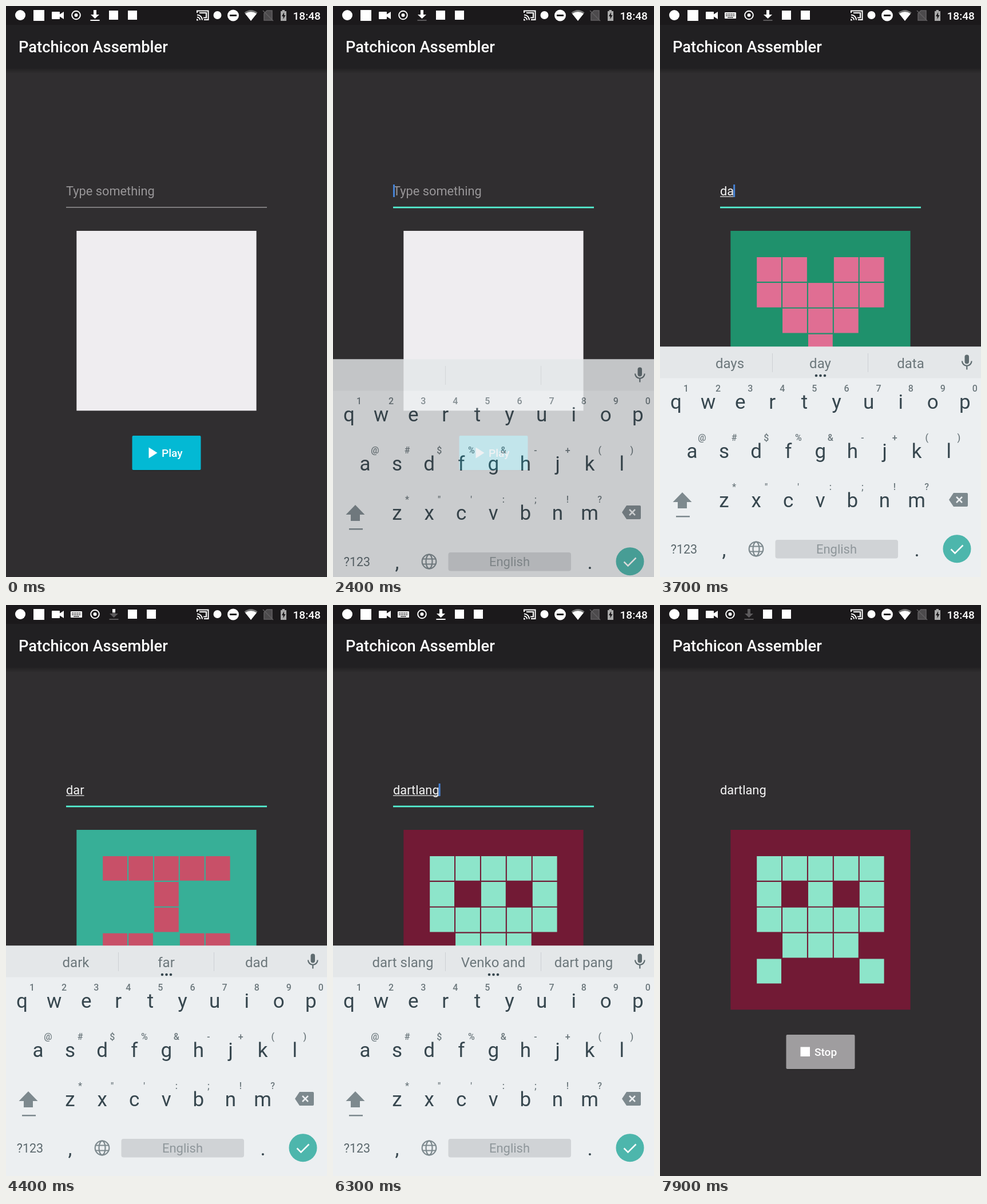
These frames come from a looping animation (561x998 px, 8000 ms). An HTML page:

```html
<!DOCTYPE html>
<html lang="en">
<head>
<meta charset="utf-8">
<title>Patchicon Assembler</title>
<style>
html, body { margin: 0; width: 100%; height: 100%; overflow: hidden; background: #302e30; }
svg { display: block; width: 561px; height: 998px; font-family: Roboto, "Noto Sans", sans-serif; }
.medium { font-weight: 500; }
</style>
</head>
<body>
<svg id="stage" viewBox="0 0 561 998">
  <defs>
    <linearGradient id="barShadow" x2="0" y2="1">
      <stop offset="0" stop-color="#000" stop-opacity=".28"/>
      <stop offset="1" stop-color="#000" stop-opacity="0"/>
    </linearGradient>
    <clipPath id="downloadClip"><rect id="downloadLevel" x="-12" y="0" width="24" height="33"/></clipPath>
    <g id="downloadShape"><path d="M-2.5 7h5v8h5L0 22-7.5 15h5z"/><path d="M-8 24H8v2H-8z"/></g>
  </defs>
  <rect width="561" height="998" fill="#302e30"/>
  <rect y="33" width="561" height="76" fill="#212022"/>
  <rect y="109" width="561" height="9" fill="url(#barShadow)"/>
  <rect width="561" height="33" fill="#1b191b"/>
  <text class="medium" x="22" y="81" font-size="27.300" fill="#fff">Patchicon Assembler</text>

  <g id="status" fill="#fff">
    <circle cx="25" cy="16" r="9"/>
    <rect x="48" y="7" width="19" height="19"/>
    <path d="M81 10h12q1 0 1 1v3.500l7-4.500v13l-7-4.500V22q0 1-1 1H81q-1 0-1-1V11q0-1 1-1z"/>
    <g id="keyboardIcon">
      <rect x="113" y="11" width="20" height="11" rx="1"/>
      <path d="M115 14h16M115 17h16" stroke="#1b191b" stroke-width="1.500" stroke-dasharray="2 1"/>
      <path d="M118 20h10" stroke="#1b191b" stroke-width="1.300"/>
    </g>
    <g id="notices">
      <circle cx="122.500" cy="16" r="7.300" fill="none" stroke="#fff" stroke-width="2"/>
      <circle cx="122.500" cy="16" r="3"/>
      <g transform="translate(155.500)">
        <use href="#downloadShape" fill="#5c5a5c"/>
        <g clip-path="url(#downloadClip)"><use href="#downloadShape"/></g>
      </g>
      <rect x="180" y="8" width="16" height="16"/>
      <rect x="213" y="8" width="16" height="16"/>
    </g>
    <g fill="none" stroke="#fff" stroke-width="2">
      <path d="M334 12V8.500h19.500V24H346M334 15.500a9 9 0 0 1 9 9M334 19.500a5 5 0 0 1 5 5"/>
      <path d="M338 12h12v8.500h-5"/>
    </g>
    <path d="M333 22.500a3 3 0 0 1 3 3h-3z"/>
    <circle cx="369.500" cy="16" r="7"/>
    <circle cx="397" cy="16.500" r="10"/>
    <path d="M391 15h12v3h-12z" fill="#1b191b"/>
    <path d="M428 26 416.500 11.500Q428 2.500 439.500 11.500z" fill="#777"/>
    <path d="M428 26 418 13.500Q428 7 438 13.500z"/>
    <path d="M456 8h9v17h-14V13zM449 8l18 18" fill="#4c4a4c" stroke="#615f61" stroke-width="1.500"/>
    <path d="M482.500 7h4.500v2h3v17h-10V9h2.500z" fill="#aaa"/>
    <path d="M486 11l-4 7h2.500v5l4-7H486z" fill="#1b191b"/>
    <text class="medium" x="501.500" y="24" font-size="19.100">18:48</text>
  </g>

  <text id="field" x="105" y="331" font-size="21.800"></text>
  <rect id="composing" x="105" y="332.500" height="1.300" fill="#ddd"/>
  <rect id="cursor" y="312" width="3" height="22" fill="#4682d4"/>
  <rect id="fieldLine" x="105" width="351"/>

  <rect id="board" x="123.300" y="393" width="314.300" height="314.300"/>
  <path id="cells"/>

  <rect x="221" y="752" width="119" height="60.500" rx="2" fill="#000" opacity=".2"/>
  <rect id="button" x="220.500" y="751" width="120" height="60" rx="2"/>
  <path id="buttonIcon" fill="#fff"/>
  <text id="buttonLabel" class="medium" y="788" font-size="19.100" fill="#fff"></text>

  <g id="keyboard">
    <rect y="595.500" width="561" height="440" fill="#eceff1"/>
    <rect y="595.500" width="561" height="55" fill="#e4e7e9"/>
    <path d="M196.500 607v33M363.500 607v33" stroke="#cdd1d4"/>
    <g id="words" font-size="24" fill="#6c777b" text-anchor="middle"></g>
    <g id="dots" fill="#37474f"><circle cx="273" cy="646" r="2.300"/><circle cx="280.500" cy="646" r="2.300"/><circle cx="288" cy="646" r="2.300"/></g>
    <rect x="532.500" y="609.500" width="7.500" height="16" rx="3.700" fill="#5f6c70"/>
    <path d="M528 620.500a8.300 8.300 0 0 0 16.600 0M536.300 629.500v6" fill="none" stroke="#5f6c70" stroke-width="2.200"/>
    <g id="keys" fill="#37474f" text-anchor="middle"></g>
    <g fill="#7d898e">
      <path d="M39 850 55.500 867H47v11H31v-11h-8.500z"/>
      <rect x="28" y="891" width="24" height="2.500"/>
      <path d="M513 851h23q2 0 2 2v20q0 2-2 2h-23l-8-12z"/>
    </g>
    <path d="M518 858l10 10m0-10l-10 10" stroke="#eceff1" stroke-width="2.500"/>
    <text x="42" y="956.500" font-size="21.500" fill="#5b686d" text-anchor="middle">?123</text>
    <g fill="none" stroke="#7d898e" stroke-width="2.200">
      <circle cx="168" cy="949" r="12.300"/><ellipse cx="168" cy="949" rx="5.500" ry="12.300"/>
      <path d="M157 944.500h22M157 953.500h22"/>
    </g>
    <rect x="201.500" y="933" width="214.500" height="32.500" rx="4" fill="#d0d3d6"/>
    <text x="308.500" y="956.500" font-size="22" fill="#8f979b" text-anchor="middle">English</text>
    <circle cx="519" cy="948.700" r="24.500" fill="#4db6ac"/>
    <path d="M508.500 949.500l7 7 14-14" fill="none" stroke="#fff" stroke-width="2.500"/>
  </g>
</svg>
<script>
const LOOP = 8000;
const FOCUS = 2000, KEYBOARD_IN = 2310, ICON_IN = 2600;
const BLUR = 6650, KEYBOARD_OUT = 6820, ICON_OUT = 6850, PRESS = 7650;

// Each row of a pattern holds its left half and middle; the right half mirrors it.
const edits = [
  { at: 0, text: "", color: "#efedf0", rows: [], words: [] },
  { at: 3000, text: "d", color: "#7b4fa3", rows: ["101", "010", "111", "011", "100"], words: ["did", "do", "don't"] },
  { at: 3500, text: "da", color: "#1f916c", rows: ["110", "111", "011", "001", "010"], words: ["days", "day", "data"] },
  { at: 3850, text: "dar", color: "#37af97", rows: ["111", "001", "001", "110", "101"], words: ["dark", "far", "dad"] },
  { at: 5200, text: "dart", color: "#a5742c", rows: ["011", "110", "101", "111", "010"], words: ["darts", "dart", "dirt"] },
  { at: 5400, text: "dartl", color: "#3d65b0", rows: ["101", "111", "010", "101", "110"], words: ["dart", "darts", "dartle"] },
  { at: 5550, text: "dartla", color: "#60a02f", rows: ["111", "100", "111", "010", "101"], words: ["Brinu", "Venko", "darts"] },
  { at: 5780, text: "dartlan", color: "#2b7f9e", rows: ["010", "111", "101", "110", "011"], words: ["dart land", "Venko an", "dart plan"] },
  { at: 5980, text: "dartlang", color: "#721a35", rows: ["111", "101", "111", "011", "100"], words: ["dart slang", "Venko and", "dart pang"] }
];

const $ = id => document.getElementById(id);
const set = (node, attrs) => { for (const k in attrs) node.setAttribute(k, attrs[k]); };
const clamp = v => Math.max(0, Math.min(1, v));
const show = (node, on) => set(node, { visibility: on ? "visible" : "hidden" });

function addText(parent, text, attrs) {
  const node = document.createElementNS("http://www.w3.org/2000/svg", "text");
  node.textContent = text;
  set(node, attrs);
  parent.appendChild(node);
  return node;
}

function addKeys(letters, hints, left, y) {
  [...letters].forEach((letter, i) => {
    const x = left + i * 56.1;
    addText($("keys"), letter, { x, y, "font-size": 35 });
    addText($("keys"), hints[i], { x: x + 17.5, y: y - 30, "font-size": 16, fill: "#6c787d", class: "medium" });
  });
}

addKeys("qwertyuiop", "1234567890", 28, 704);
addKeys("asdfghjkl", "@#$%&-+()", 56, 790);
addKeys("zxcvbnm", "*\"':;!?", 112, 875.5);
addText($("keys"), ",", { x: 112, y: 962, "font-size": 35 });
addText($("keys"), ".", { x: 449, y: 962, "font-size": 35 });
const words = [122, 280, 438].map(x => addText($("words"), "", { x, y: 633 }));

function complement(hex) {
  return "#" + (0xffffff ^ parseInt(hex.slice(1), 16)).toString(16).padStart(6, "0");
}

function cellPath(rows) {
  const pitch = 44.9, size = 42.8;
  let d = "";
  rows.forEach((row, y) => {
    for (let x = 0; x < 5; x++) {
      if (row[Math.min(x, 4 - x)] === "1") {
        d += `M${124.3 + (x + 1) * pitch} ${394.1 + (y + 1) * pitch}h${size}v${size}h${-size}z`;
      }
    }
  });
  return d;
}

function drawStatus(t) {
  const typing = t >= ICON_IN && t < ICON_OUT;
  set($("notices"), { transform: `translate(${typing ? 33 : 0})` });
  set($("keyboardIcon"), { opacity: typing ? 1 : t >= ICON_OUT ? 0.6 * clamp((7000 - t) / 100) : 0 });
  const step = Math.floor((t + 60) % 1260 / 210);
  set($("downloadLevel"), { height: [33, 0, 10, 13, 15, 23][step] });
}

function drawField(t, edit) {
  const focused = t >= FOCUS && t < BLUR;
  const field = $("field");
  field.textContent = edit.text || "Type something";
  set(field, { fill: edit.text ? "#f4f4f4" : "#989698" });
  const width = edit.text ? field.getComputedTextLength() : 0;
  set($("composing"), { width });
  show($("composing"), focused && edit.text);
  set($("cursor"), { x: 105 + width - (width ? 1 : 0) });
  show($("cursor"), focused && (t - Math.max(FOCUS, edit.at)) % 1000 < 500);
  set($("fieldLine"), focused
    ? { y: 350.7, height: 2.7, fill: "#55f3d5" }
    : { y: 351, height: 1.7, fill: "#8b898b" });
  show($("fieldLine"), t < PRESS);
}

function drawButton(playing) {
  set($("button"), { fill: playing ? "#9f9d9f" : "#03b9d4" });
  set($("buttonIcon"), { d: playing ? "M245.500 772.500h16.500v16.500h-16.500z" : "M249.500 771.500v19l15-9.500z" });
  $("buttonLabel").textContent = playing ? "Stop" : "Play";
  set($("buttonLabel"), { x: playing ? 270 : 272 });
}

function drawKeyboard(t, edit) {
  const enter = clamp((t - KEYBOARD_IN) / 220);
  const leave = clamp((t - KEYBOARD_OUT) / 200);
  const shift = Math.round(63 * (1 - enter) ** 2 + 81 * leave ** 2);
  const opacity = (1 - (1 - enter) ** 3.2) * (1 - leave ** 1.8);
  set($("keyboard"), { transform: `translate(0 ${shift})`, opacity });
  words.forEach((node, i) => { node.textContent = edit.words[i] || ""; });
  show($("dots"), edit.text);
}

function draw(t) {
  const edit = edits.filter(e => e.at <= t).pop();
  drawStatus(t);
  drawField(t, edit);
  set($("board"), { fill: edit.color });
  set($("cells"), { d: cellPath(edit.rows), fill: complement(edit.color) });
  drawButton(t >= PRESS);
  drawKeyboard(t, edit);
}

const start = performance.now();
function tick() {
  draw((performance.now() - start) % LOOP);
  requestAnimationFrame(tick);
}
tick();
</script>
</body>
</html>
```
